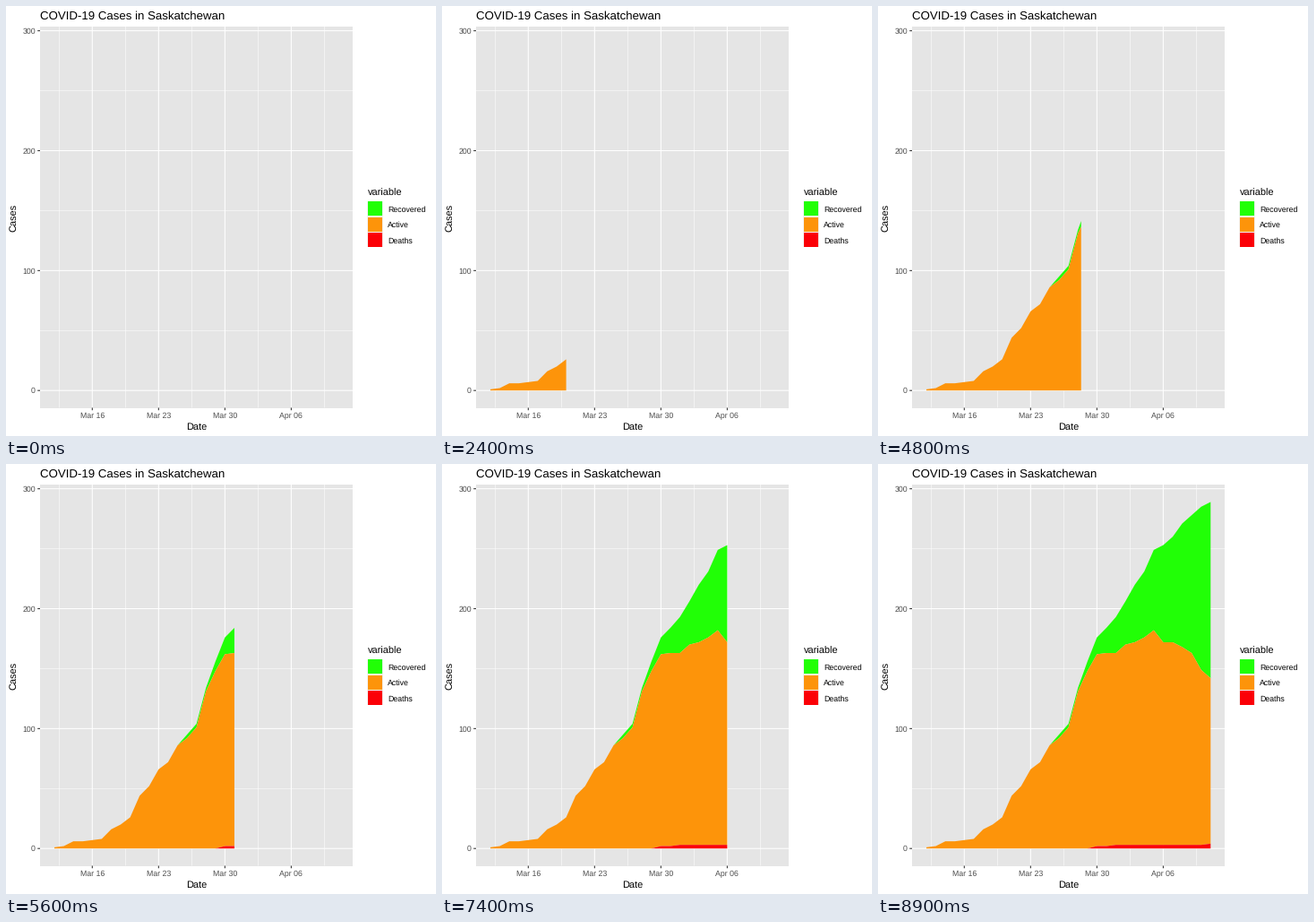
Write a matplotlib script that moves like this. It is 480x480 px and loops after 10000 ms.

```python
import numpy as np
import matplotlib.pyplot as plt
from matplotlib.animation import FuncAnimation
from matplotlib.patches import Polygon, Rectangle

plt.rcParams["font.family"] = "Liberation Sans"
plt.rcParams["text.hinting"] = "none"
plt.rcParams["toolbar"] = "None"

SIZE, DPI = 480, 100
PT = 72 / DPI  # points per pixel
FRAMES, LAST = 100, 89

LEFT, RIGHT, TOP, BOTTOM = 38, 387, 23, 448.5
X0, DAY = 54, 10.576
Y0, CASE = 429.2, 1.3385

GREEN, ORANGE, RED = "#21FF06", "#FD940A", "#FB0007"

# Daily counts from Mar 12 to Apr 11
total = np.array([1, 2, 6, 6, 7, 8, 16, 20, 26, 44, 52, 66, 72, 86, 95, 104,
                  134, 156, 176, 184, 193, 206, 220, 231, 249, 253, 260, 271,
                  278, 285, 289])
recovered = np.array([0] * 14 + [3, 3, 3, 8, 14, 21, 30, 36, 48, 55, 67, 81,
                                 88, 103, 115, 136, 147])
deaths = np.array([0] * 18 + [2, 2] + [3] * 10 + [4])
days = np.arange(len(total))
key_frames = np.round(days * LAST / days[-1])


def px(day):
    return X0 + day * DAY


def py(cases):
    return Y0 - cases * CASE


fig = plt.figure(figsize=(SIZE / DPI, SIZE / DPI), dpi=DPI, facecolor="white")
ax = fig.add_axes([0, 0, 1, 1])
ax.set_xlim(0, SIZE)
ax.set_ylim(SIZE, 0)
ax.axis("off")


def box(x, y, w, h, color, z=0):
    ax.add_patch(Rectangle((x, y), w, h, fc=color, lw=0, zorder=z))


def line(xs, ys, color, width, z=1):
    ax.plot(xs, ys, color=color, lw=width * PT, zorder=z, snap=False,
            solid_capstyle="butt")


def label(x, y, text, size, color="black", ha="left", **kw):
    ax.text(x, y, text, fontsize=size * PT, color=color, ha=ha,
            va="baseline", **kw)


# Panel and grid
box(LEFT, TOP, RIGHT - LEFT, BOTTOM - TOP, "#E5E5E5")
for cases in (50, 150, 250):
    line([LEFT, RIGHT], [py(cases)] * 2, "white", 0.53)
for day in np.arange(0.5, 30, 7):
    line([px(day)] * 2, [TOP, BOTTOM], "white", 0.53)
for cases in (0, 100, 200, 300):
    y = py(cases)
    line([LEFT, RIGHT], [y, y], "white", 1.07, 2)
    line([LEFT - 2.75, LEFT], [y, y], "#333333", 1.07, 2)
    label(33, y + 3.2, str(cases), 8.8, "#4D4D4D", "right")
for day, name in zip((4, 11, 18, 25), ("Mar 16", "Mar 23", "Mar 30", "Apr 06")):
    x = px(day)
    line([x, x], [TOP, BOTTOM], "white", 1.07, 2)
    line([x, x], [BOTTOM, BOTTOM + 2.75], "#333333", 1.07, 2)
    label(x, 460.2, name, 8.8, "#4D4D4D", "center")

# Titles
label(38, 15, "COVID-19 Cases in Saskatchewan", 13.2)
label(212.5, 473, "Date", 11, ha="center")
ax.text(13.3, 236, "Cases", fontsize=11 * PT, rotation=90, ha="right",
        va="center")

# Legend
label(403.5, 212, "variable", 11)
box(403.4, 217.6, 17.28, 51.84, "#F2F2F2")
for i, (name, color) in enumerate([("Recovered", GREEN), ("Active", ORANGE),
                                   ("Deaths", RED)]):
    y = 226.3 + 17.28 * i
    box(404.1, y - 7.93, 15.86, 15.86, color, 1)
    label(426.2, y + 3.6, name, 8.8)

# Stacked bands as (lower, upper, color)
bands = [(total - recovered, total, GREEN),
         (deaths, total - recovered, ORANGE),
         (0 * deaths, deaths, RED)]
areas = [Polygon([(X0, Y0)] * 3, fc=color, lw=0, zorder=3, snap=False)
         for *_, color in bands]
for area in areas:
    ax.add_patch(area)


def update(frame):
    # Each day is reached on a whole frame, with even steps in between
    now = np.interp(min(frame, LAST), key_frames, days)
    t = np.append(days[days < now], now)
    for area, (low, high, _) in zip(areas, bands):
        xs = np.concatenate([t, t[::-1]])
        ys = np.concatenate([np.interp(t, days, high),
                             np.interp(t, days, low)[::-1]])
        area.set_xy(np.column_stack([px(xs), py(ys)]))
    return areas


anim = FuncAnimation(fig, update, frames=FRAMES, interval=100, repeat=True,
                     repeat_delay=0)
plt.show()
```
